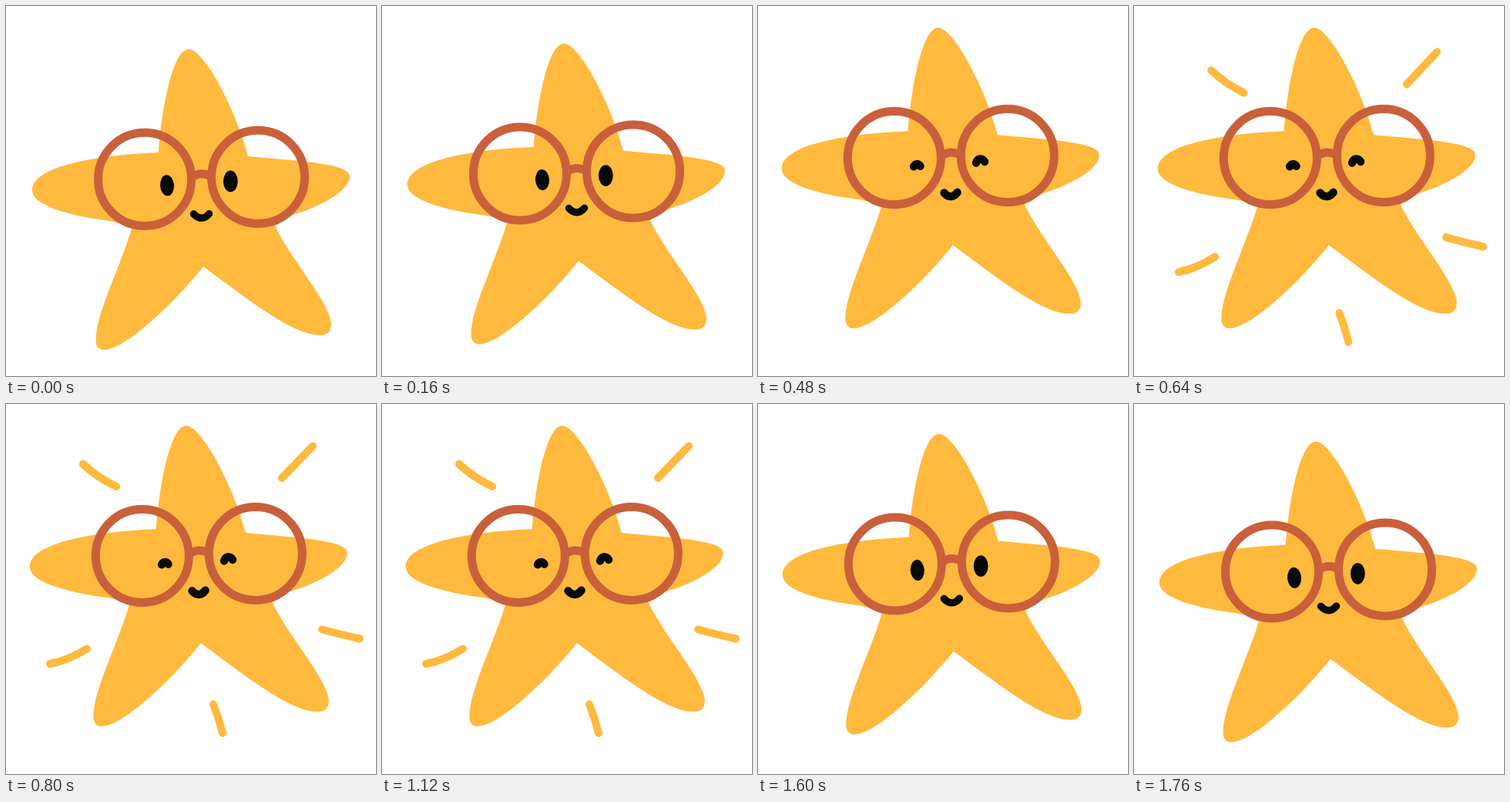
An HTML page for the animation above (1.92 s loop, 480x480 px).

```html
<!DOCTYPE html>
<html lang="en">
<head>
<meta charset="utf-8">
<title>Happy star</title>
<style>
  html, body { margin: 0; width: 100%; height: 100%; overflow: hidden; background: #fff; }
  svg { display: block; width: 100%; height: 100%; }
  .line { fill: none; stroke-linecap: round; stroke-linejoin: round; }
</style>
</head>
<body>
<svg viewBox="0 0 480 480">
  <g id="rays" class="line" stroke="#ffb93d" stroke-width="10">
    <path d="M358 96L398 54.5M100 78Q118 95 143 107M410 292.5Q430 298 459 304.5M57 337Q80 333 105 317.5M269 389.5Q276 407 281 427"/>
  </g>
  <g id="star">
    <path fill="#ffb93d" d="M198 190C201 142 215 56 237 56C256 56 297 130 314 195
      C372 201 446 203 446 221C446 240 408 260 372 271L349 285
      C366 324 420 384 422 412C422 421 418 427 408 427C372 428 308 376 256 338
      C223 380 156 446 127 446C121 446 116.5 442 116.5 433C116.5 399 152 330 164 285
      L135 279C82 272 34 259 34 239C34 210 107 194 198 190Z"/>
    <g class="line" stroke="#c9603b" stroke-width="11">
      <circle cx="180" cy="224.8" r="60.5"/>
      <circle cx="327" cy="221.8" r="60.5"/>
      <path d="M243 221Q253 215 264 220"/>
    </g>
    <g id="calm" fill="#060a05">
      <ellipse cx="209" cy="232.8" rx="9" ry="13.5" transform="rotate(-4 209 233)"/>
      <ellipse cx="291.3" cy="227.4" rx="9.4" ry="13.8"/>
      <path class="line" stroke="#060a05" stroke-width="9.5" d="M243.5 269.8Q254 280.5 263.5 269.5"/>
    </g>
    <g id="happy" class="line" stroke="#060a05" stroke-width="10.4">
      <path d="M205.2 236C207 232 211.5 232 213.7 235.5M286.2 231.2C288.2 224.7 294.2 224.7 297.2 229.7M244.7 270.2C250 276.5 257 276.5 261.8 269.5"/>
    </g>
  </g>
</svg>
<script>
const STEP = 160, LAST = 6;
const hop = [[0, 0], [-1, -7.3], [-2.2, -17.2], [-3.2, -27.7]];
const rayPose = { 4: "matrix(.983 0 0 1.0105 1.9 4.5)", 5: "", 6: "translate(0 -4)" };
const [rays, star, calm, happy] = ["rays", "star", "calm", "happy"].map(id => document.getElementById(id));
const show = (el, on) => el.setAttribute("visibility", on ? "visible" : "hidden");

function draw(now) {
  // Poses run forward to the last one, then back again
  const step = Math.floor(now / STEP) % (2 * LAST);
  const pose = LAST - Math.abs(LAST - step);
  star.setAttribute("transform", `translate(${hop[Math.min(pose, 3)]})`);
  rays.setAttribute("transform", rayPose[pose] || "");
  show(rays, pose > 3);
  show(calm, pose < 3);
  show(happy, pose >= 3);
}

function tick() {
  draw(performance.now());
  requestAnimationFrame(tick);
}
tick();
</script>
</body>
</html>
```
